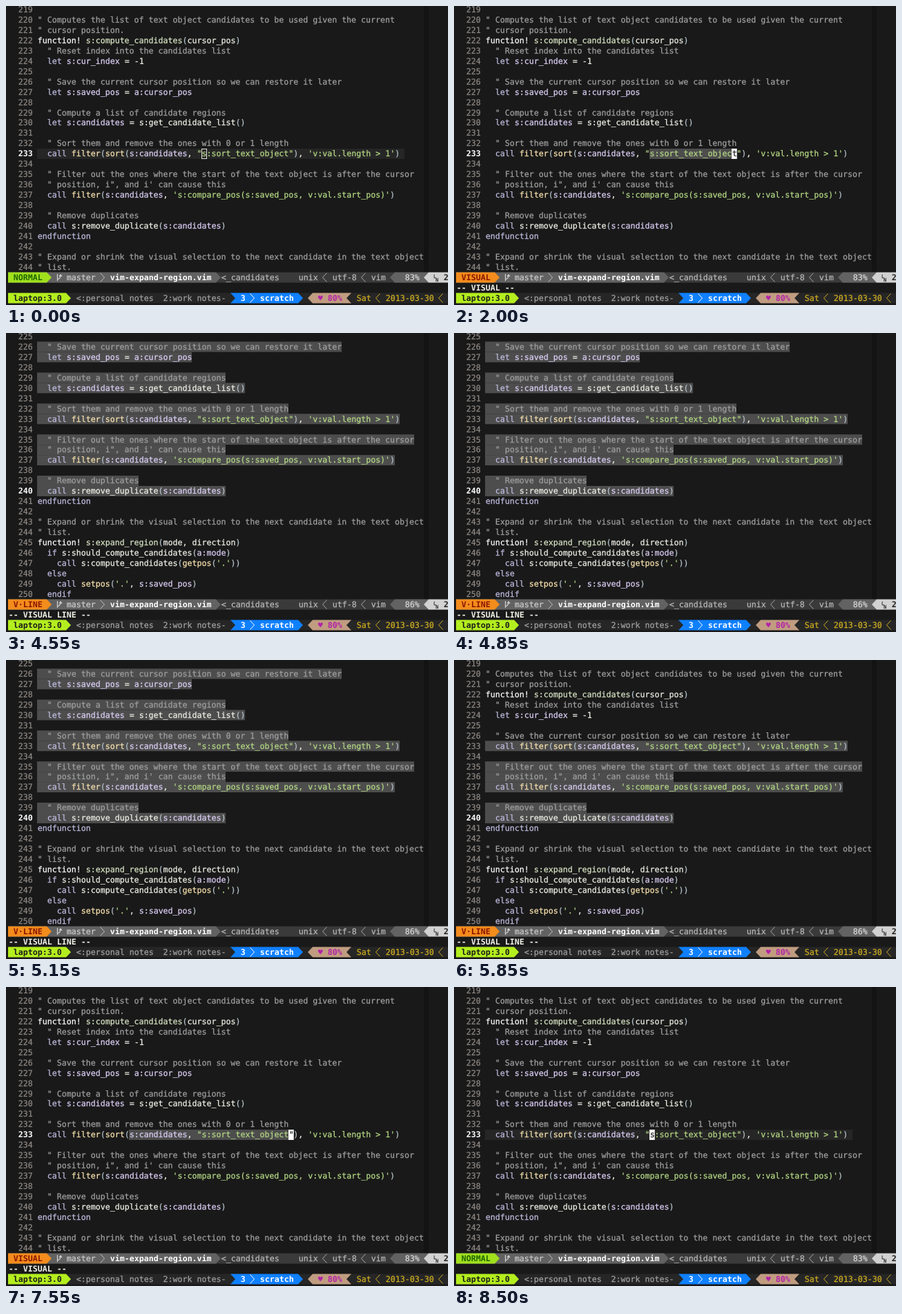
An HTML page for the animation above (8.7 s loop, 640 by 434 pixels).

```html
<!DOCTYPE html>
<html lang="en">
<head>
<meta charset="utf-8">
<title>Expanding selection</title>
<style>
  html, body { margin: 0; width: 100%; height: 100%; overflow: hidden; background: #191919; }
  svg { display: block; width: 640px; height: 434px; }
  text {
    font: 11.627px "DejaVu Sans Mono", "Liberation Mono", monospace;
    white-space: pre; text-rendering: geometricPrecision;
  }
  text, tspan { fill: currentColor; stroke: currentColor; stroke-width: .25px; }
  .b { font-weight: bold; stroke: none; }
  .tiny { font-size: 7px; }
</style>
</head>
<body>
<svg id="stage" viewBox="0 0 640 434"></svg>
<script>
const LOOP = 8700;
const CELL = 7, LINE = 14.96, LEFT = 3, TOP = -2.4, GUTTER = 6;
const TEXT_X = 0.8, BASELINE = 11.3;
const FIRST = 219, ROWS = 26, STATUS = 26, MESSAGE = 27, TMUX = 28;

const C = {
  bg: '#191919', column: '#131313', cursorLine: '#262626', select: '#4d4d4d',
  number: '#8c8783', text: '#f0f0e8', comment: '#a0a0a0', keyword: '#bfbce0',
  variable: '#dccff6', func: '#f8e2ae', string: '#b4d884', paren: '#b4c2ca',
  name: '#d8e4c4', white: '#ffffff',
  green: '#a0e01c', session: '#b4ee1e', orange: '#f28c1c', grey: '#626262', dark: '#3a3a3a', light: '#d2d2d2',
  tmux: '#262626', dim: '#a0a0a0', blue: '#0f80ff', tan: '#c09c80', magenta: '#b321a8', gold: '#cfae20'
};

const source = `
" Computes the list of text object candidates to be used given the current
" cursor position.
function! s:compute_candidates(cursor_pos)
  " Reset index into the candidates list
  let s:cur_index = -1

  " Save the current cursor position so we can restore it later
  let s:saved_pos = a:cursor_pos

  " Compute a list of candidate regions
  let s:candidates = s:get_candidate_list()

  " Sort them and remove the ones with 0 or 1 length
  call filter(sort(s:candidates, "s:sort_text_object"), 'v:val.length > 1')

  " Filter out the ones where the start of the text object is after the cursor
  " position, i", and i' can cause this
  call filter(s:candidates, 's:compare_pos(s:saved_pos, v:val.start_pos)')

  " Remove duplicates
  call s:remove_duplicate(s:candidates)
endfunction

" Expand or shrink the visual selection to the next candidate in the text object
" list.
function! s:expand_region(mode, direction)
  if s:should_compute_candidates(a:mode)
    call s:compute_candidates(getpos('.'))
  else
    call setpos('.', s:saved_pos)
  endif`.split('\n');

const lineText = n => source[n - FIRST];

// Column ranges on line 233, inclusive.
const HOME = 233, START = 34;
const normal = { mode: 'NORMAL', cursor: START };
const visual = (from, to) => ({ mode: 'VISUAL', from, cursor: to });
const word = visual(34, 51);
const innerArgs = visual(19, 52), aroundArgs = visual(18, 53);
const outerArgs = visual(14, 73), aroundOuter = visual(13, 74);
const lines = { mode: 'V·LINE', scroll: 6 };

const timeline = [
  [0, { ...normal, hollow: true }],
  [50, normal],
  [1550, word],
  [2100, innerArgs],
  [2650, aroundArgs],
  [3150, outerArgs],
  [3650, aroundOuter],
  [4450, lines],
  [5850, { ...lines, repainted: 8 }],
  [5900, aroundOuter],
  [6400, outerArgs],
  [6850, aroundArgs],
  [7350, innerArgs],
  [7850, word],
  [8300, normal]
];

const esc = s => s.replace(/&/g, '&amp;').replace(/</g, '&lt;').replace(/>/g, '&gt;');
const x = col => LEFT + col * CELL;
const y = row => TOP + row * LINE;

const block = (col, row, width, fill) =>
  `<rect x="${x(col)}" y="${y(row)}" width="${width * CELL}" height="${LINE}" fill="${fill}"/>`;
const put = (col, row, body, color, cls = '') =>
  `<text x="${x(col) + TEXT_X}" y="${y(row) + BASELINE}" color="${color}" class="${cls}">${body}</text>`;
const label = (col, row, s, color, cls) => put(col, row, esc(s), color, cls);

// Solid separator one cell wide; dir 1 points right, -1 points left.
function wedge(col, row, dir, fill) {
  const base = dir > 0 ? x(col) : x(col + 1);
  return `<path d="M${base} ${y(row)}l${dir * CELL} ${LINE / 2}l${-dir * CELL} ${LINE / 2}z" fill="${fill}"/>`;
}

function chevron(col, row, dir, stroke) {
  const base = dir > 0 ? x(col) + 0.5 : x(col + 1) - 0.5;
  return `<path d="M${base} ${y(row) + 1}l${dir * 6} 6.5l${-dir * 6} 6.5" fill="none" stroke="${stroke}"/>`;
}

const rules = [
  [/^("[^"]*"|'[^']*')/, C.string],
  [/^(let|call|if|else|endif|endfunction)\b/, C.keyword],
  [/^(filter|sort|getpos|setpos)\b/, C.func],
  [/^[sa]:\w+(?![\w(])/, C.variable],
  [/^[()]/, C.paren],
  [/^([sa]:)?\w+/, C.text],
  [/^[^\w()"']/, C.text]
];

function highlight(s) {
  const span = (t, color) => `<tspan color="${color}">${esc(t)}</tspan>`;
  if (/^\s*"/.test(s)) return span(s, C.comment);
  let out = '';
  const head = s.match(/^(function! )(s:\w+)/);
  if (head) {
    out = span(head[1], C.white) + span(head[2], C.name);
    s = s.slice(head[0].length);
  }
  while (s) {
    const [pattern, color] = rules.find(r => r[0].test(s));
    const token = s.match(pattern)[0];
    out += span(token, color);
    s = s.slice(token.length);
  }
  return out;
}

function cursor({ cursor: col, hollow }) {
  const row = HOME - FIRST, at = GUTTER + col;
  if (hollow) {
    return `<rect x="${x(at) + 0.5}" y="${y(row) + 0.5}" width="7" height="14" fill="none" stroke="#e4e4dc"/>`;
  }
  return block(at, row, 1.1, C.white) + label(at, row, lineText(HOME)[col], '#222222');
}

function editor(s) {
  let out = `<rect x="${x(GUTTER + 80)}" width="${CELL}" height="${y(STATUS)}" fill="${C.column}"/>`;
  const current = s.scroll ? 240 : HOME;
  for (let row = 0; row < ROWS; row++) {
    const fresh = row < (s.repainted || 0);
    const n = FIRST + row + (fresh ? 0 : s.scroll || 0);
    const text = lineText(n) || '';
    if (s.mode === 'NORMAL' && n === HOME) out += block(GUTTER, row, text.length + 1, C.cursorLine);
    if (s.mode === 'VISUAL' && n === HOME) {
      out += block(GUTTER + s.from, row, s.cursor - s.from + 1, C.select);
    }
    if (s.scroll && !fresh && n >= 223 && n <= 240) out += block(GUTTER, row, text.length, C.select);
    out += label(2, row, String(n), n === current ? C.white : C.number, n === current ? 'b' : '');
    out += put(GUTTER, row, highlight(text), C.text);
  }
  return out + (s.cursor === undefined ? '' : cursor(s));
}

function statusLine(s) {
  const r = STATUS, isNormal = s.mode === 'NORMAL';
  const accent = isNormal ? C.green : C.orange;
  const gx = x(10) + 1.5, gy = y(r) + 2.5;
  return block(0, r, 92, C.dark) +
    block(0, r, 43, C.grey) + wedge(43, r, 1, C.grey) +
    block(0, r, 8, accent) + wedge(8, r, 1, accent) +
    label(1, r, s.mode, isNormal ? '#1f6400' : '#8a1500', 'b') +
    `<path d="M${gx} ${gy}v10m0-2.5q4.5-.5 4.5-5.5m-2 1.5l2-2.5l2 2.5" fill="none" stroke="#d0d0d0" stroke-width="1.3"/>` +
    label(12, r, 'master', '#cccccc') +
    chevron(19, r, 1, '#c0c0c0') +
    label(21, r, 'vim-expand-region.vim', C.white, 'b') +
    label(44, r, '<_candidates', '#b8b8b8') +
    label(60, r, 'unix', '#b8b8b8') + chevron(65, r, -1, '#a8a8a8') +
    label(67, r, 'utf-8', '#b8b8b8') + chevron(73, r, -1, '#a8a8a8') +
    label(75, r, 'vim', '#b8b8b8') +
    wedge(79, r, -1, C.grey) + block(80, r, 7, C.grey) +
    label(82, r, s.scroll ? '86%' : '83%', '#d8d8d8') +
    wedge(86, r, -1, C.light) + block(87, r, 5, C.light) +
    `<text class="tiny" x="${x(88)}" y="${y(r) + 8}" color="#333">L</text>` +
    `<text class="tiny" x="${x(88) + 3}" y="${y(r) + 13}" color="#333">N</text>` +
    label(90, r, '2', '#222222', 'b');
}

function message(s) {
  const shown = { VISUAL: '-- VISUAL --', 'V·LINE': '-- VISUAL LINE --' }[s.mode];
  return shown ? label(0, MESSAGE, shown, C.text, 'b') : '';
}

function tmuxLine() {
  const r = TMUX;
  return block(0, r, 92, C.tmux) +
    block(0, r, 12, C.session) + wedge(12, r, 1, C.session) +
    label(1, r, 'laptop:3.0', '#1c1c1c', 'b') +
    label(14, r, '<:personal notes  2:work notes-', C.dim) +
    block(46, r, 14, C.blue) + wedge(46, r, 1, C.tmux) + wedge(60, r, 1, C.blue) +
    label(48, r, '3', C.white, 'b') + chevron(50, r, 1, C.white) +
    label(52, r, 'scratch', C.white, 'b') +
    wedge(62, r, -1, C.tan) + block(63, r, 8, C.tan) + wedge(70, r, -1, C.tmux) +
    label(64, r, '♥ 80%', C.magenta, 'b') +
    label(72, r, 'Sat', C.gold) + chevron(76, r, -1, C.gold) +
    label(78, r, '2013-03-30', C.gold) + chevron(89, r, -1, C.gold);
}

const stage = document.getElementById('stage');
let shown = null;

function render(t) {
  const state = timeline.filter(([at]) => at <= t).pop()[1];
  if (state === shown) return;
  shown = state;
  stage.innerHTML = `<rect width="640" height="434" fill="${C.bg}"/>` +
    editor(state) + statusLine(state) + message(state) + tmuxLine();
}

const began = performance.now();
function tick() {
  render((performance.now() - began) % LOOP);
  requestAnimationFrame(tick);
}
tick();
</script>
</body>
</html>
```
